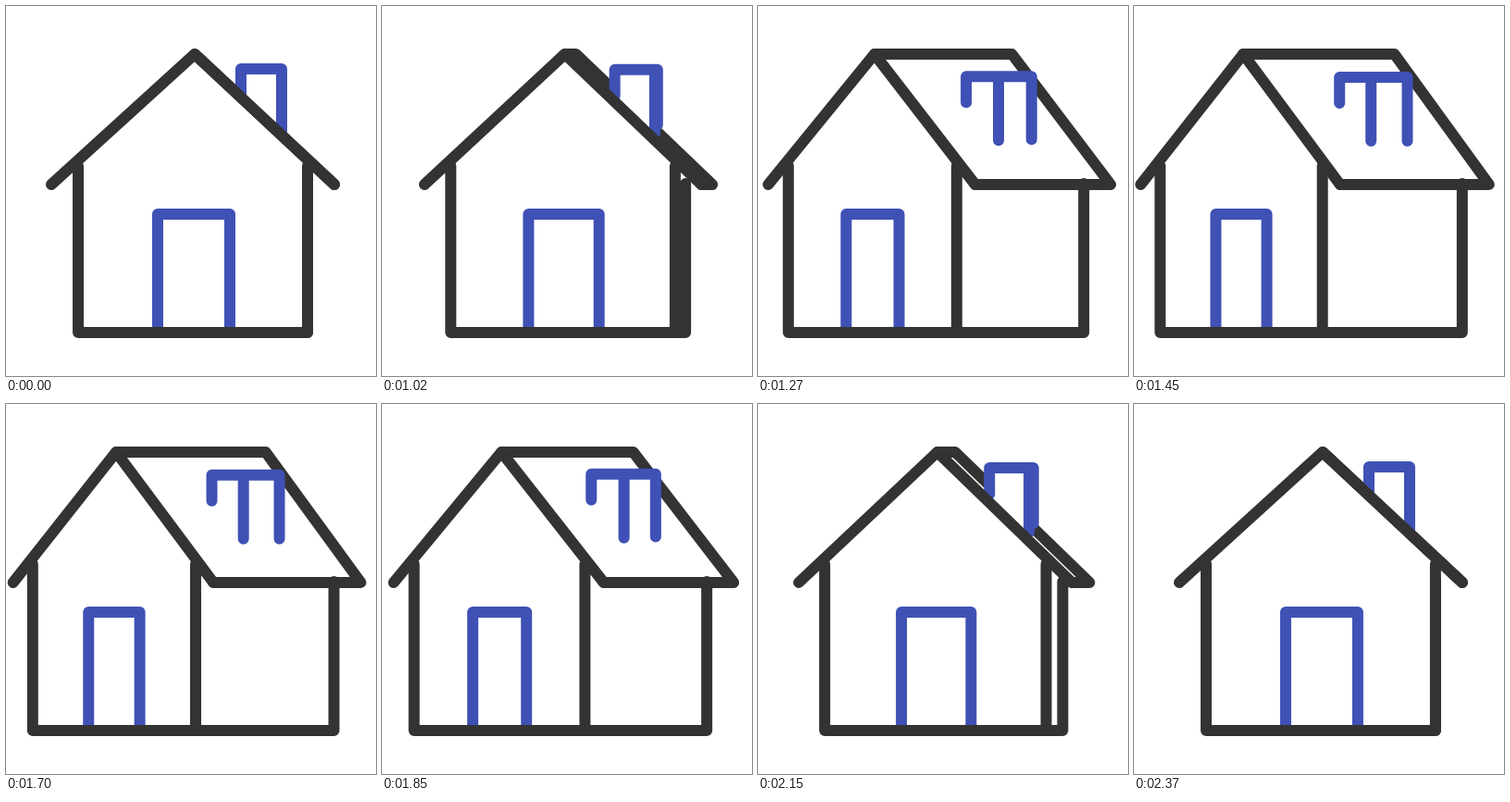
An HTML page for the animation above (2400 ms loop, 400x400 px).

```html
<!DOCTYPE html>
<html lang="en">
<head>
<meta charset="utf-8">
<title>House turning</title>
<style>
  html, body { margin: 0; width: 100%; height: 100%; overflow: hidden; background: #fff; }
  svg { display: block; width: 100%; height: 100%; }

  path {
    fill: none;
    stroke: #333;
    stroke-width: 12;
    stroke-linecap: round;
    stroke-linejoin: round;
    animation: 2400ms infinite;
  }
  .blue { stroke: #3f51b5; }
  .mask { fill: #fff; stroke: none; }

  #ridge { animation-name: ridge; }
  #stack-mask { animation-name: stack-mask; }
  #stack { animation-name: stack; }
  #door { animation-name: door; }
  #walls { animation-name: walls; }
  #corner { animation-name: corner; }
  #gable { animation-name: gable; }

  /* Front view at rest, quick turn to the side, slower turn back */
  @keyframes ridge {
    0%, 42.08%, 99.8%, 100% {
      d: path("M204 52 L204 52 L355 193 L355 193");
      animation-timing-function: cubic-bezier(.25, 1, .5, 1);
    }
    66.46% {
      d: path("M117.6 52 L282 52 L384 193 L222 193");
      animation-timing-function: cubic-bezier(.65, 0, .35, 1);
    }
  }
  @keyframes stack-mask {
    0%, 42.08%, 99.8%, 100% {
      d: path("M254 96.5 L254 68 L298 68 L298 127 L298 137.5 Z");
      animation-timing-function: cubic-bezier(.25, 1, .5, 1);
    }
    66.46% {
      d: path("M222 105 L222 77 L295.5 77 L295.5 146 L256 146 Z");
      animation-timing-function: cubic-bezier(.65, 0, .35, 1);
    }
  }
  @keyframes stack {
    0%, 42.08%, 99.8%, 100% {
      d: path("M254 96.5 L254 68 L298 68 L298 127 M298 68 L298 137.5");
      animation-timing-function: cubic-bezier(.25, 1, .5, 1);
    }
    66.46% {
      d: path("M222 105 L222 77 L295.5 77 L295.5 146 M256 77 L256 146");
      animation-timing-function: cubic-bezier(.65, 0, .35, 1);
    }
  }
  @keyframes door {
    0%, 42.08%, 99.8%, 100% {
      d: path("M164 350 L164 225 L242 225 L242 350");
      animation-timing-function: cubic-bezier(.25, 1, .5, 1);
    }
    66.46% {
      d: path("M88 350 L88 225 L143 225 L143 350");
      animation-timing-function: cubic-bezier(.65, 0, .35, 1);
    }
  }
  @keyframes walls {
    0%, 42.08%, 99.8%, 100% {
      d: path("M78 173 L78 353 L326 353 L326 192");
      animation-timing-function: cubic-bezier(.25, 1, .5, 1);
    }
    66.46% {
      d: path("M28 173 L28 353 L355 353 L355 192");
      animation-timing-function: cubic-bezier(.65, 0, .35, 1);
    }
  }
  @keyframes corner {
    0%, 42.08%, 99.8%, 100% {
      d: path("M326 173 L326 353");
      animation-timing-function: cubic-bezier(.25, 1, .5, 1);
    }
    66.46% {
      d: path("M203 173 L203 353");
      animation-timing-function: cubic-bezier(.65, 0, .35, 1);
    }
  }
  @keyframes gable {
    0%, 42.08%, 99.8%, 100% {
      d: path("M49 193 L204 52 L355 193");
      animation-timing-function: cubic-bezier(.25, 1, .5, 1);
    }
    66.46% {
      d: path("M7 193 L117.6 52 L222 193");
      animation-timing-function: cubic-bezier(.65, 0, .35, 1);
    }
  }
</style>
</head>
<body>
<svg viewBox="0 0 400 400">
  <path id="ridge"/>
  <path id="stack-mask" class="mask"/>
  <path id="stack" class="blue"/>
  <path id="door" class="blue"/>
  <path id="walls"/>
  <path id="corner"/>
  <path id="gable"/>
</svg>
</body>
</html>
```
